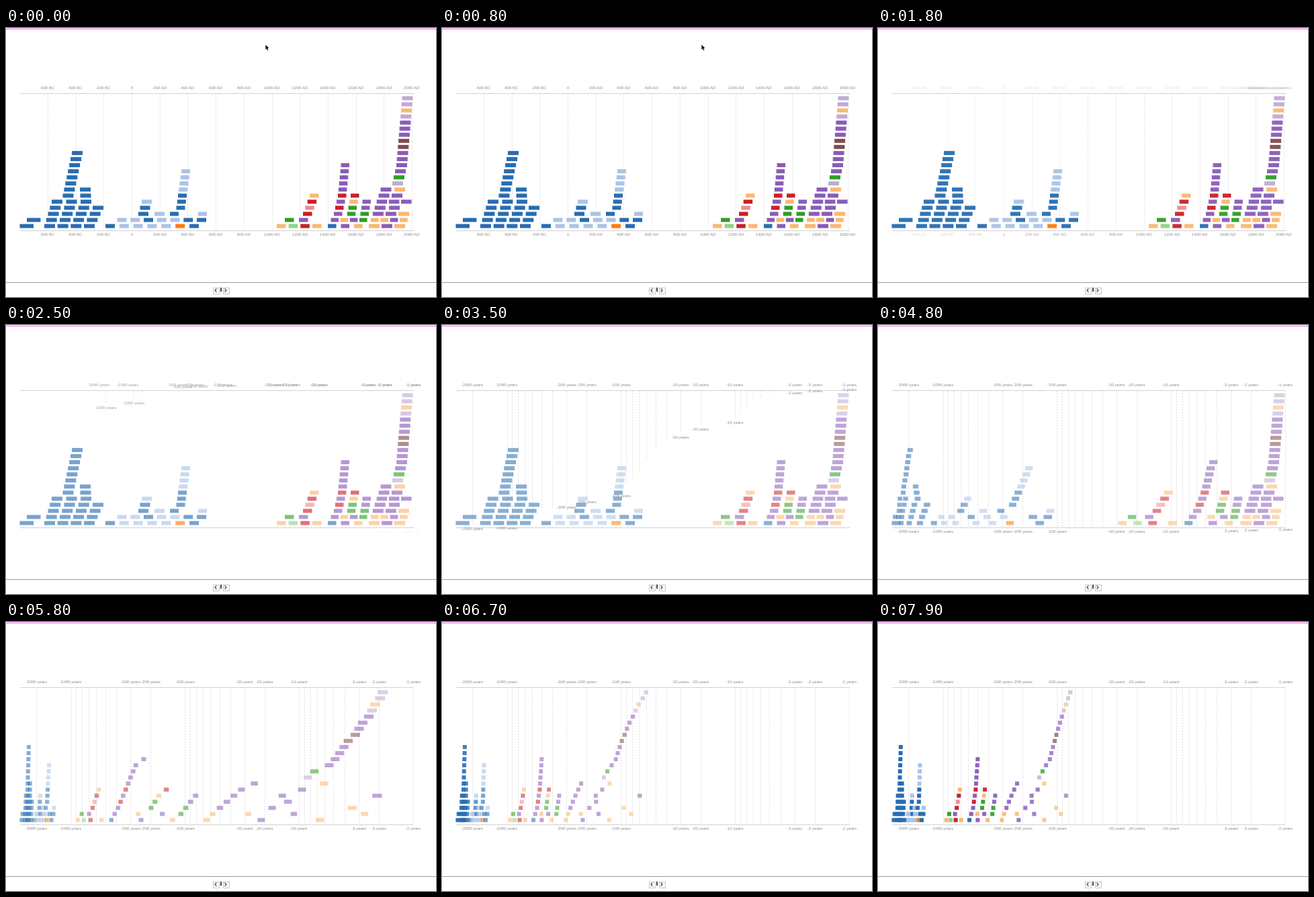
Animation, 640 px wide and 400 px high, one loop 8000 ms. Source, as a matplotlib script:

```python
import numpy as np
import matplotlib.pyplot as plt
from matplotlib.animation import FuncAnimation
from matplotlib.patches import Rectangle, Polygon

W, H, DPI = 640, 400, 100
STEP, LOOP = 100, 8000
PX = 72 / DPI
TOP, BOTTOM, LEFT, RIGHT = 96.5, 300.5, 20.5, 606
LABEL_TOP, LABEL_BOTTOM = 89, 307

AXIS_START, BARS_START, DURATION = 1200, 3210, 2000
BAR_LAG, TICK_LAG = 15.9, 46
FADED = 0.55
BAR_H, ROW_H, SQUARE, GAP = 6, 9.05, 6, 2.6

COLORS = dict(b="#286db2", l="#abc3e6", o="#ff7a0e", y="#fab870", g="#309e26",
              e="#92d482", r="#cc1f28", k="#f08c8c", p="#8a5cb8", v="#bfabd4",
              n="#824b4b")


def ease(t, start, duration=DURATION):
    """Cubic in-out progress, clamped to 0..1."""
    u = min(max((t - start) / duration, 0), 1)
    return 4 * u ** 3 if u < 0.5 else 1 - 4 * (1 - u) ** 3


def mix(a, b, p):
    return a + (b - a) * p


def year_x(year):
    return 187 + 0.2085 * year


def x_year(x):
    return (x - 187) / 0.2085


def ago_x(ago):
    return RIGHT - 169.8 * np.log10(ago)


def cluster(words, width, left, right, base=0):
    """One word per row, one colour per bar, spread evenly between two outlines."""
    for row, word in enumerate(words.split(), base):
        x0, x1 = (np.interp(row, *zip(*edge)) for edge in (left, right))
        n = len(word)
        pitch = (x1 - x0) / (n - 1) if n > 1 else width + GAP
        for k, kind in enumerate(word):
            yield x0 + k * pitch, min(width, pitch - GAP), row, kind


def load_bars():
    """Bars in order of birth; outlines are (row, x) key points."""
    early = [(0, 20.5), (1, 31)]
    return sorted([
        *cluster("b b", 20.5, early, early),
        *cluster("bbbb " * 4 + "bbb bb bb" + " b" * 6, 16,
                 [(0, 57), (4, 68), (5, 84.5), (12, 98)],
                 [(0, 116), (3, 129), (4, 111), (6, 110)]),
        *cluster("bllllob llbllbb", 14, [(0, 148), (1, 165.5)], [(0, 273), (1, 284)]),
        *cluster("bl b l", 15, [(2, 197), (4, 202)], [(2, 221)], base=2),
        *cluster("bl b b b l l l l", 13, [(2, 244), (3, 253.5), (9, 261)],
                 [(2, 286)], base=2),
        *cluster("yery gp r k r y", 13.5, [(0, 403), (1, 415), (2, 442), (5, 452)],
                 [(0, 456), (1, 436)]),
        *cluster("bpy pypg pgg rgp pyp rr" + " p" * 5, 12.5,
                 [(0, 479), (2, 488), (5, 494), (10, 498.5)],
                 [(0, 518), (1, 526), (4, 530.5), (5, 513)]),
        *cluster("ypy yypy ppy pp ppp pp py v g p p p p n n p p p v y v v", 16,
                 [(0, 540), (6, 557.5), (7, 575), (10, 581), (21, 589.5)],
                 [(0, 578), (1, 586), (2, 584), (3, 570), (4, 588), (5, 574),
                  (6, 578)]),
    ])


fig = plt.figure(figsize=(W / DPI, H / DPI), dpi=DPI, facecolor="white")
ax = fig.add_axes([0, 0, 1, 1])
ax.set_xlim(0, W)
ax.set_ylim(H, 0)
ax.axis("off")


def line(xs, ys, color, width=1, **kw):
    return ax.plot(xs, ys, color=color, lw=width * PX, **kw)[0]


def grid_line(x):
    return line([x, x], [TOP, BOTTOM], "#dedede", zorder=1,
                ls=(0, (2, 2)), dash_capstyle="butt")


def label(x, y, text):
    return ax.text(x, y + 2.2, text, ha="center", va="baseline", color="#8c8c8c",
                   fontfamily="Liberation Sans", fontsize=6.2 * PX, zorder=2)


def year_name(year):
    return "0" if year == 0 else f"{abs(year)} {'AD' if year > 0 else 'BC'}"


# Page furniture
line([0, W], [0.5, 0.5], "#ff5cf5")
line([0, W], [377.5, 377.5], "#9a9a9a")
for y in (TOP, BOTTOM):
    line([LEFT, RIGHT], [y, y], "#d2d2d2")
for x, d in ((307.5, 1), (322.5, -1)):
    ax.add_patch(Rectangle((x, 385.5), 9, 9, fc="#fafafa", ec="#c8c8c8", lw=PX))
    cx = x + 4.5
    line([cx + d, cx - d, cx + d], [388, 390.2, 392.4], "#222222")
line([320, 320], [386, 392], "#444444", 2, solid_capstyle="butt")
edge = line([0, W], [399.5, 399.5], "#333333", ls=(0, (5, 1)))
arrow = np.array([(0, 0), (0, 7), (1.6, 5.6), (2.8, 8.4), (3.9, 7.9), (2.8, 5.2),
                  (5, 5.1)])
pointer = ax.add_patch(Polygon(arrow + (386.4, 25), fc="black", ec="none", zorder=5))

# Calendar scale
calendar = []
for year in range(-600, 2001, 200):
    x, name = year_x(year), year_name(year)
    calendar.append((grid_line(x), label(x, LABEL_TOP, name),
                     label(x, LABEL_BOTTOM, name)))

# Years-ago scale
agos = [2000, 1000] + [m * d for d in (100, 10, 1) for m in range(9, 0, -1)]
ticks = []
for ago in agos:
    texts = ()
    if str(ago)[0] in "123":
        texts = [label(RIGHT, LABEL_TOP, f"-{ago} years") for _ in range(2)]
    ticks.append((ago_x(ago), grid_line(RIGHT), texts))

bars = []
for x, width, row, kind in load_bars():
    patch = Rectangle((x, 294.5 - ROW_H * row - BAR_H / 2), width, BAR_H,
                      fc=COLORS[kind], ec="none", lw=0, zorder=3, snap=False)
    ax.add_patch(patch)
    bars.append((patch, x, width, ago_x(2010 - x_year(x))))


def draw_calendar(t):
    top_alpha = 1 - ease(t, AXIS_START, 1000)
    for i, (grid, upper, lower) in enumerate(calendar):
        alpha = 1 - ease(t, AXIS_START + i * TICK_LAG, 1000)
        for part, a in ((grid, alpha), (lower, alpha), (upper, top_alpha)):
            part.set_alpha(a)
            part.set_visible(a > 0.01)


def draw_ticks(t):
    p_top, p_low = ease(t, AXIS_START - 8), ease(t, AXIS_START + 15)
    for i, (x, grid, texts) in enumerate(ticks):
        drop = ease(t, 1825 + i * TICK_LAG)
        x_low = mix(RIGHT, x, p_low)
        y = mix(LABEL_TOP, LABEL_BOTTOM, drop)
        end = y - 6.5
        grid.set_data([x_low, x_low], [TOP, end])
        grid.set_alpha(p_low)
        grid.set_visible(end > TOP + 0.5)
        if texts:
            upper, lower = texts
            upper.set_x(mix(RIGHT, x, p_top))
            lower.set_position((x_low, y + 2.2))
            for text, p in ((upper, p_top), (lower, p_low)):
                text.set_alpha(p)
                text.set_visible(p > 0.01)


def draw_bars(t):
    fade = mix(1, FADED, ease(t, AXIS_START))
    for i, (patch, x, width, goal) in enumerate(bars):
        start = BARS_START + i * BAR_LAG
        p = ease(t, start)
        patch.set_x(mix(x, goal, p))
        patch.set_width(mix(width, SQUARE, p))
        patch.set_alpha(mix(fade, 1, ease(t, start + DURATION)))


def update(frame):
    t = frame * STEP
    for part in (pointer, edge):
        part.set_visible(t < AXIS_START)
    draw_calendar(t)
    draw_ticks(t)
    draw_bars(t)
    return []


anim = FuncAnimation(fig, update, frames=LOOP // STEP, interval=STEP,
                     repeat=True, repeat_delay=0, blit=False)
plt.show()
```
